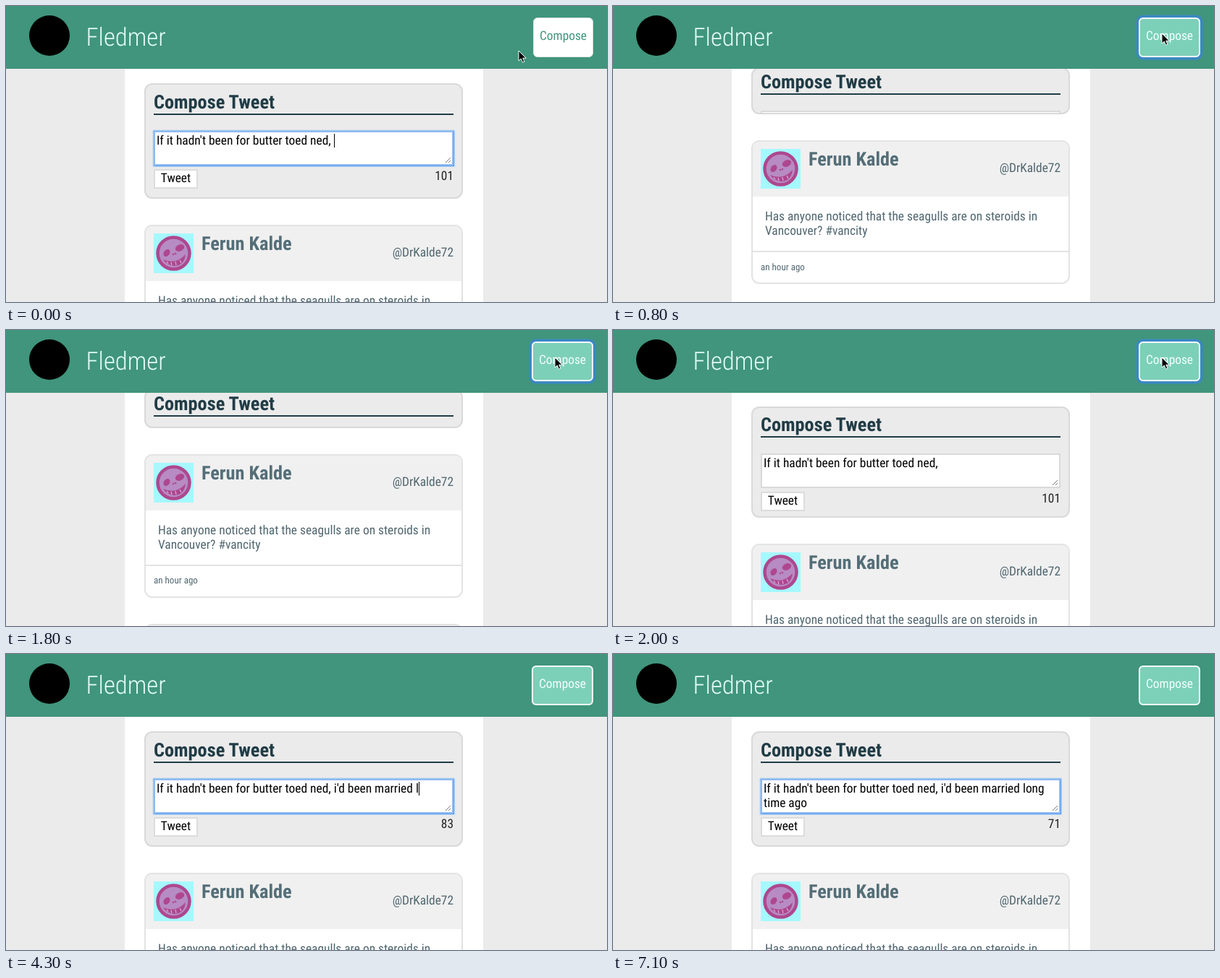
Recreate the animation shown at these times as an HTML page. Size 830 px wide and 410 px high, loop 7.2 s.

```html
<!DOCTYPE html>
<html lang="en">
<head>
<meta charset="utf-8">
<title>Compose form</title>
<style>
  * { box-sizing: border-box; margin: 0; }
  html, body { width: 100%; height: 100%; overflow: hidden; background: #ebebeb; }
  body {
    position: relative; color: #50666f;
    font: 17.4px/20px "Roboto Condensed", Roboto, sans-serif;
    font-stretch: 75%; text-rendering: geometricPrecision;
  }
  .tight * { letter-spacing: -.054em; }
  header, main, section, article, h1, h2, p, svg, .logo, .button, .content, .field, .send, .count, .top { position: absolute; }
  h1, h2, p, .count { white-space: nowrap; }

  header { left: 0; top: 0; width: 830px; height: 87px; background: #40957c; }
  .logo { left: 32px; top: 13px; width: 56px; height: 56px; border-radius: 50%; background: #000; }
  h1 { left: 110.5px; top: 23.5px; font-size: 34.8px; line-height: 40px; font-weight: 300; color: #e2fcf5; }
  .button {
    right: 19px; top: 16px; width: 83px; height: 55px; line-height: 51px; text-align: center;
    border-radius: 6px; color: #40957c; background: #fff; border: 1px solid #d5e2de;
  }
  .button.hover { width: 85px; color: #f4fffb; background: #7dd0b8; border: 2px solid #fff; line-height: 49px; }
  .button.focus { box-shadow: 0 0 1px 3.5px #3b88c3; }

  main { left: 164px; top: 0; width: 495px; height: 410px; overflow: hidden; background: #fff; }
  section, article { left: 27px; width: 440px; border: 2px solid #e3e3e3; border-radius: 11px; overflow: hidden; }
  section { background: #ebebeb; border-color: #d9d9d9; }
  .content { left: 11px; width: 414px; height: 136px; }
  h2 { font-size: 26.3px; line-height: 30px; font-weight: 700; }
  .content h2 { width: 414px; height: 32px; color: #213c46; border-bottom: 2px solid #213c46; }
  .field {
    top: 54px; width: 414px; height: 48px; padding: 2px; white-space: pre-wrap;
    color: #000; background: #fff; border: 2px solid #d9d9d9;
  }
  .field.focus { border-color: #8dbbf2; box-shadow: 0 0 1.5px 1.5px #5b9ff0; }
  .caret { display: inline-block; width: 1px; height: 19px; margin-right: -1px; vertical-align: -4px; background: #000; }
  .field svg { right: 1px; bottom: 1px; }
  .send {
    top: 107px; width: 61px; height: 27px; line-height: 23px; text-align: center;
    color: #000; background: #fff; border: 2px solid #dcdcdc;
  }
  .count { right: 0; top: 107px; color: #222; }

  article { height: 199px; background: #fff; }
  .top { width: 436px; height: 76px; background: #f0f0f0; }
  .top svg { left: 11px; top: 10px; }
  .top h2 { left: 77px; top: 10px; color: #546e78; }
  .top p { right: 11px; top: 27px; }
  .message { left: 17px; top: 94px; }
  .age { left: 0; top: 151px; width: 436px; height: 44px; padding: 13.5px 11px; border-top: 2px solid #e3e3e3; font-size: 13.05px; line-height: 15px; }
  #cursor { left: -2px; top: -2px; }
</style>
</head>
<body>
<main>
  <section id="form">
    <div class="content" id="content">
      <h2>Compose Tweet</h2>
      <div class="field" id="field"><span id="typed"></span><i class="caret" id="caret"></i><svg width="9" height="9" stroke="#777"><path d="M1 8L8 1M5 8L8 5"/></svg></div>
      <div class="send">Tweet</div>
      <div class="count" id="count">101</div>
    </div>
  </section>
  <article>
    <div class="top">
      <svg width="55" height="55">
        <path fill="#a5f8fd" d="M0 0h55v55H0z"/>
        <circle cx="27.5" cy="27.5" r="22" fill="#b78bc3" stroke="#ae478f" stroke-width="4.5"/>
        <g fill="#ae478f">
          <ellipse cx="18" cy="27" rx="5.5" ry="4" transform="rotate(-55 18 27)"/>
          <ellipse cx="36" cy="20" rx="6.5" ry="4.5" transform="rotate(-25 36 20)"/>
          <circle cx="27" cy="29" r="1.3"/><circle cx="30" cy="28" r="1.3"/>
        </g>
        <path d="M13 36Q31 44 44 29Q42 45 28 45Q18 44 13 36Z" fill="#ae478f"/>
        <path d="M18 39l2 3M24 40l1 4M30 39l1 5M36 37l2 4" stroke="#d3b2da" stroke-width="1.2"/>
      </svg>
      <h2>Ferun Kalde</h2><p>@DrKalde72</p>
    </div>
    <p class="message">Has anyone noticed that the seagulls are on steroids in<br>Vancouver? #vancity</p>
    <div class="age top" style="background:none">an hour ago</div>
  </article>
  <article>
    <div class="top">
      <svg width="55" height="55" fill="none" stroke="#f0995c" stroke-width="2.5">
        <path fill="#936aa9" stroke="none" d="M0 0h55v55H0z"/>
        <circle cx="27.5" cy="27.5" r="22" fill="#4f9bf1" stroke-width="4.5"/>
        <path d="M13 23q4 5 10 2M33 25q6 3 9-3M15 34q13 7 25-1"/>
        <path fill="#f0995c" d="M24 37v6q4 4 8 0v-6z"/>
      </svg>
      <h2>Pia Gorquez</h2><p>@DrGorquez</p>
    </div>
  </article>
</main>
<header>
  <div class="logo"></div>
  <h1>Fledmer</h1>
  <div class="button" id="button">Compose</div>
</header>
<svg id="cursor" width="16" height="22"><path transform="translate(2 2)" fill="#000" stroke="#fff" d="M0 0V14L3.3 11L5.5 16.2L7.9 15.2L5.7 10.2H10.2Z"/></svg>
<script>
const LOOP = 7200, CLOSE = 573, OPEN = 1649, SLIDE = 400, FOCUS = OPEN + SLIDE;
const TYPE = 2780, KEY = 87;
const START = "If it hadn't been for butter toed ned, ";
const REST = "i'd been married long time ago";

const $ = id => document.getElementById(id);
const [form, content, field, typed, caret, count, button, cursor] =
  ["form", "content", "field", "typed", "caret", "count", "button", "cursor"].map($);
const cards = document.querySelectorAll("article");

const clamp = (x, lo, hi) => Math.min(hi, Math.max(lo, x));
const swing = (t, start, length) => .5 - Math.cos(Math.PI * clamp((t - start) / length, 0, 1)) / 2;

// tighten the letters where no condensed face is available
document.body.classList.toggle("tight", count.offsetWidth > 27);

function layout(open) {
  const top = 71 + 36 * open, height = 4 + 156 * open;
  form.style.display = open > 0 ? "" : "none";
  form.style.top = top + "px";
  form.style.height = height + "px";
  content.style.top = 10 * open + "px";
  const first = open > 0 ? top + height + 36 : 107;
  cards.forEach((card, i) => card.style.top = first + 235 * i + "px");
}

function draw(now) {
  const t = now % LOOP;
  layout(1 - swing(t, CLOSE, SLIDE) + swing(t, OPEN, SLIDE));

  const move = swing(t, 50, 400), x = 708 + 50 * move, y = 62 - 24 * move;
  cursor.style.transform = `translate(${x}px, ${y}px)`;
  cursor.style.display = t < TYPE ? "" : "none";
  button.classList.toggle("hover", x >= 728);
  button.classList.toggle("focus", t >= CLOSE && t < FOCUS);

  const keys = clamp(Math.floor((t - TYPE) / KEY) + 1, 0, REST.length);
  const text = START + REST.slice(0, keys);
  if (typed.textContent !== text) typed.textContent = text;
  count.textContent = 140 - text.length;

  const focused = t < CLOSE || t >= FOCUS;
  const blinkStart = keys ? TYPE + (keys - 1) * KEY : t < FOCUS ? 0 : FOCUS;
  field.classList.toggle("focus", focused);
  caret.style.visibility = focused && (t - blinkStart) % 1000 < 500 ? "visible" : "hidden";
  requestAnimationFrame(draw);
}
requestAnimationFrame(draw);
</script>
</body>
</html>
```
